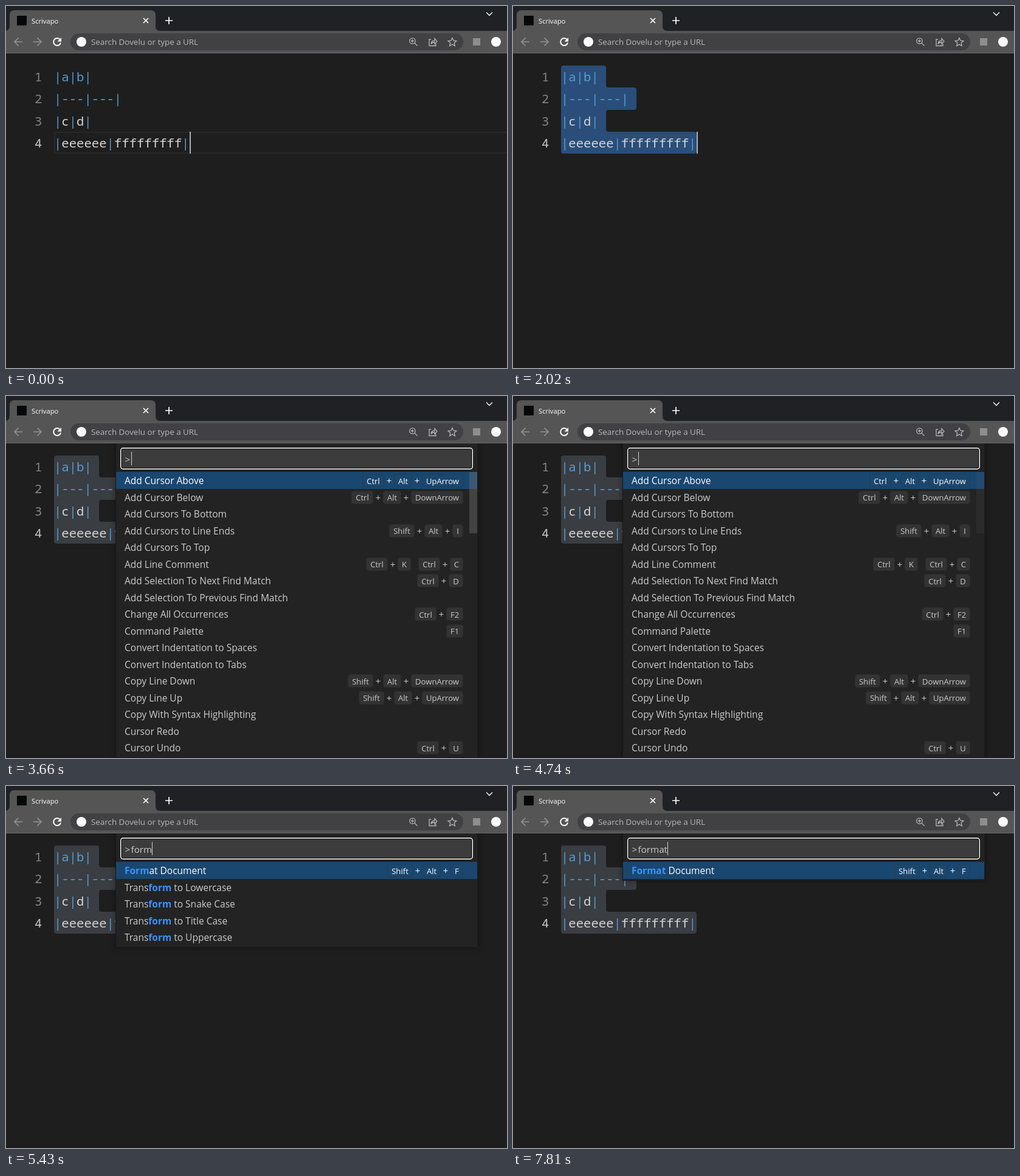
Write an HTML page that moves like this. It is 824 px wide and 596 px high and loops after 8000 ms.

```html
<!DOCTYPE html>
<html lang="en">
<head>
<meta charset="utf-8">
<title>Command palette</title>
<style>
  html, body { margin: 0; width: 100%; height: 100%; overflow: hidden; background: #1e1e1e; }
  svg { display: block; width: 824px; height: 596px; }
  text { font-family: "Open Sans", "Noto Sans", sans-serif; white-space: pre; }
  .code text { font: 20.6px "Noto Sans Mono", "DejaVu Sans Mono", monospace; fill: #d4d4d4; }
  .code .mark { fill: #569cd6; }
  .code .num { fill: #858585; }
  .code .active { fill: #c6c6c6; }
  .icon { fill: none; stroke: #fff; stroke-width: 1.7; }
  .thin { stroke: #b4b4b4; stroke-width: 1.3; }
  .label { font-size: 15.5px; fill: #ccc; }
  .hit { font-weight: 700; fill: #3794ff; }
  .key { font-size: 13.1px; fill: #ccc; text-anchor: middle; }
  .plus { font-size: 15px; fill: #ccc; text-anchor: middle; }
  .focused text { fill: #fff; }
  .cap { fill: #333; stroke: #2c2c2c; }
  .focused .cap { fill: none; stroke: #333; stroke-opacity: .6; }
  .query { font-size: 15.2px; fill: #ccc; }
  #panel { filter: drop-shadow(0 0 5px rgba(0, 0, 0, .4)); }
</style>
</head>
<body>
<svg viewBox="0 0 824 596" xmlns="http://www.w3.org/2000/svg">
  <defs><clipPath id="page"><rect y="78" width="824" height="518"/></clipPath></defs>
  <rect width="824" height="596" fill="#1e1e1e"/>

  <!-- browser frame -->
  <rect width="824" height="41" fill="#202124"/>
  <path d="M-2 41Q6 41 6 33V15Q6 7 14 7H238Q246 7 246 15V33Q246 41 254 41Z" fill="#555"/>
  <rect y="41" width="824" height="36" fill="#555"/>
  <rect y="77" width="824" height="1" fill="#666"/>
  <rect x="18" y="16" width="16" height="16" fill="#050808"/>
  <text x="42" y="29" font-size="11.2" fill="#fff">Scrivapo</text>
  <path class="icon" d="M226 20l8 8m0-8l-8 8M262 24h12m-6-6v12"/>
  <path class="icon" d="M790 10.5l5 5 5-5" style="stroke-width:1.3"/>
  <path class="icon" d="M27 59H14m6.5-6.5L14 59l6.500 6.500M45 59h13m-6.500-6.500L58 59l-6.500 6.500" style="stroke:#929292"/>
  <path class="icon" d="M89 55.500A6 6 0 1 0 90 60.500" style="stroke-width:2"/>
  <path d="M91 52v6.500h-6.500Z" fill="#fff"/>
  <rect x="106" y="45" width="646" height="28" rx="14" fill="#414043"/>
  <circle cx="124" cy="59" r="8" fill="#fff"/>
  <text x="140" y="64" font-size="13.4" fill="#b9b9b9">Search Dovelu or type a URL</text>
  <g class="icon thin">
    <circle cx="668.500" cy="57.500" r="4.700"/>
    <path d="M672 61l4.500 4.500M666 57.500h5M668.500 55v5"/>
    <path d="M699 55h-3v10.500h11v-3M699 62.500q.5-5.500 6-5.500v-3.500l4 4.700-4 4.500V59.500q-4 0-6 3Z"/>
    <path d="M734 52.500l2 4.500 4.900.5-3.700 3.300 1.100 4.900-4.300-2.600-4.300 2.600 1.100-4.900-3.700-3.300 4.900-.5Z"/>
  </g>
  <rect x="768" y="53" width="12" height="12" fill="#8e8e8e"/>
  <circle cx="806" cy="59" r="8" fill="#fff"/>

  <!-- editor -->
  <g clip-path="url(#page)">
    <rect id="lineBox" x="80" y="208" width="760" height="34" fill="none" stroke="#282828" stroke-width="2"/>
    <path id="selection"/>
    <g id="code" class="code"></g>
    <rect id="caret" x="302" y="207" width="2" height="36" fill="#aeafad"/>

    <!-- command palette -->
    <g id="palette">
      <rect id="panel" x="180.500" y="70" width="595.500" fill="#232323" stroke="#181818"/>
      <rect x="188.700" y="85.700" width="578.600" height="34.600" rx="4" fill="#1a1a1a" stroke="#fff" stroke-width="1.400"/>
      <rect x="191" y="88" width="574" height="30" rx="1" fill="#3c3c3c"/>
      <text class="query" x="195.500" y="110">&gt;</text>
      <text class="query" id="query" x="205.500" y="110"></text>
      <rect id="queryCaret" y="92" width="1" height="22" fill="#d0d0d0"/>
      <g id="rows"></g>
      <rect id="slider" x="762" y="125" width="13" fill="#797979"/>
    </g>
  </g>
</svg>

<script>
const $ = id => document.getElementById(id);
const DURATION = 8000;
const ROW = 27.5, LIST_TOP = 125;

const FORMAT = "Format Document|Shift+Alt+F";
const TRANSFORMS = ["Lowercase", "Snake Case", "Title Case", "Uppercase"].map(c => "Transform to " + c);
const LISTS = {
  "": [
    "Add Cursor Above|Ctrl+Alt+UpArrow", "Add Cursor Below|Ctrl+Alt+DownArrow",
    "Add Cursors To Bottom", "Add Cursors to Line Ends|Shift+Alt+I",
    "Add Cursors To Top", "Add Line Comment|Ctrl+K Ctrl+C",
    "Add Selection To Next Find Match|Ctrl+D", "Add Selection To Previous Find Match",
    "Change All Occurrences|Ctrl+F2", "Command Palette|F1",
    "Convert Indentation to Spaces", "Convert Indentation to Tabs",
    "Copy Line Down|Shift+Alt+DownArrow", "Copy Line Up|Shift+Alt+UpArrow",
    "Copy With Syntax Highlighting", "Cursor Redo", "Cursor Undo|Ctrl+U"
  ],
  f: [
    "Add Selection To Next Find Match|Ctrl+D", "Add Selection To Previous Find Match",
    "Delete All Left", "Detect Indentation from Content", "Developer: Force Retokenize",
    ...["ambiguous", "invisible", "non basic ASCII"].map(k => `Disable highlighting of ${k} characters`),
    ...["In", "Out", "Reset"].map(k => "Editor Font Zoom " + k),
    "Find|Ctrl+F", "Find Next|Enter", "Find Next Selection|Ctrl+F3", "Find Previous|Shift+Enter",
    "Find Previous Selection|Ctrl+Shift+F3", "Find With Arguments"
  ],
  for: ["Developer: Force Retokenize", FORMAT, ...TRANSFORMS],
  form: [FORMAT, ...TRANSFORMS],
  forma: [FORMAT],
  format: [FORMAT]
};

// [start time, value] steps
const QUERIES = [[0, null], [3660, ""], [5190, "f"], [5310, "for"], [5430, "form"], [5580, "forma"], [5700, "format"]];
const SLIDER = [[0, 1], [4200, .95], [4470, .6], [4740, .25], [5190, .15], [5310, 0]];
const CARET_TOGGLES = [410, 1000, 1430, 2020, 2550, 2980, 3510, 3660, 4200, 4740, 6250, 6780, 7340, 7810];

const stepAt = (steps, t) => steps.filter(s => s[0] <= t).pop()[1];
const show = (id, on) => $(id).setAttribute("visibility", on ? "inherit" : "hidden");

const pen = document.createElement("canvas").getContext("2d");
function textWidth(text, size) {
  pen.font = `${size}px "Open Sans", "Noto Sans", sans-serif`;
  return pen.measureText(text).width;
}

// Key caps are laid out from the right edge towards the left.
function shortcut(keys, top) {
  let right = 752, out = "";
  keys.split(" ").reverse().forEach(chord => {
    chord.split("+").reverse().forEach((key, i) => {
      if (i) {
        out += `<text class="plus" x="${right - 8}" y="${top + 20}">+</text>`;
        right -= 16;
      }
      const w = Math.round(textWidth(key, 13.1) + 14);
      out += `<rect class="cap" x="${right - w + .5}" y="${Math.round(top + 3) + .5}" width="${w - 1}" height="21" rx="3.500"/>`
        + `<text class="key" x="${right - w / 2}" y="${top + 19.5}">${key}</text>`;
      right -= w;
    });
    right -= 12;
  });
  return out;
}

function listRow(entry, i, query) {
  const [label, keys] = entry.split("|");
  const top = LIST_TOP + i * ROW;
  const marked = query ? label.replace(new RegExp(query, "i"), m => `<tspan class="hit">${m}</tspan>`) : label;
  const back = i ? "" : `<rect x="181" y="${top}" width="594" height="28" fill="#1a4770"/>`;
  return `<g class="${i ? "" : "focused"}">${back}<text class="label" x="195" y="${top + 20}">${marked}</text>`
    + (keys ? shortcut(keys, top) : "") + "</g>";
}

function showQuery(query) {
  const list = LISTS[query];
  $("query").textContent = query;
  $("queryCaret").setAttribute("x", Math.floor(206 + textWidth(query, 15.2)));
  $("rows").innerHTML = list.map((entry, i) => listRow(entry, i, query)).join("");
  $("panel").setAttribute("height", LIST_TOP + list.length * ROW + 3 - 70);
  $("slider").setAttribute("height", query ? 233 : 101);
}

$("code").innerHTML = ["|a|b|", "|---|---|", "|c|d|", "|eeeeee|fffffffff|"].map((line, i) => {
  const y = 124 + i * 36.33;
  const body = i < 2 ? `<tspan class="mark">${line}</tspan>`
    : line.replace(/\|/g, '<tspan class="mark">|</tspan>');
  return `<text class="num${i === 3 ? " active" : ""}" x="47" y="${y}">${i + 1}</text><text x="79" y="${y}">${body}</text>`;
}).join("");

$("selection").setAttribute("d",
  "M79 102q0-4 4-4H149q4 0 4 4V130q0 4 4 4H199q4 0 4 4V167q0 4-4 4H157q-4 0-4 4V203q0 4 4 4"
  + "H298q4 0 4 4V239q0 4-4 4H83q-4 0-4-4Z");

let shown = null;
function draw(t) {
  const query = stepAt(QUERIES, t);
  const open = query !== null;
  const caretOn = CARET_TOGGLES.filter(x => x <= t).length % 2 === 0;
  const selected = t >= 2020;

  show("lineBox", !selected);
  show("selection", selected);
  $("selection").setAttribute("fill", open ? "#3a3d41" : "#2a4e79");
  show("caret", !open && caretOn);
  show("palette", open);
  show("queryCaret", caretOn);
  $("slider").setAttribute("opacity", .37 * stepAt(SLIDER, t));
  if (open && query !== shown) showQuery(query);
  shown = query;
}

const start = performance.now();
function tick() {
  draw((performance.now() - start) % DURATION);
  requestAnimationFrame(tick);
}
tick();
</script>
</body>
</html>
```
